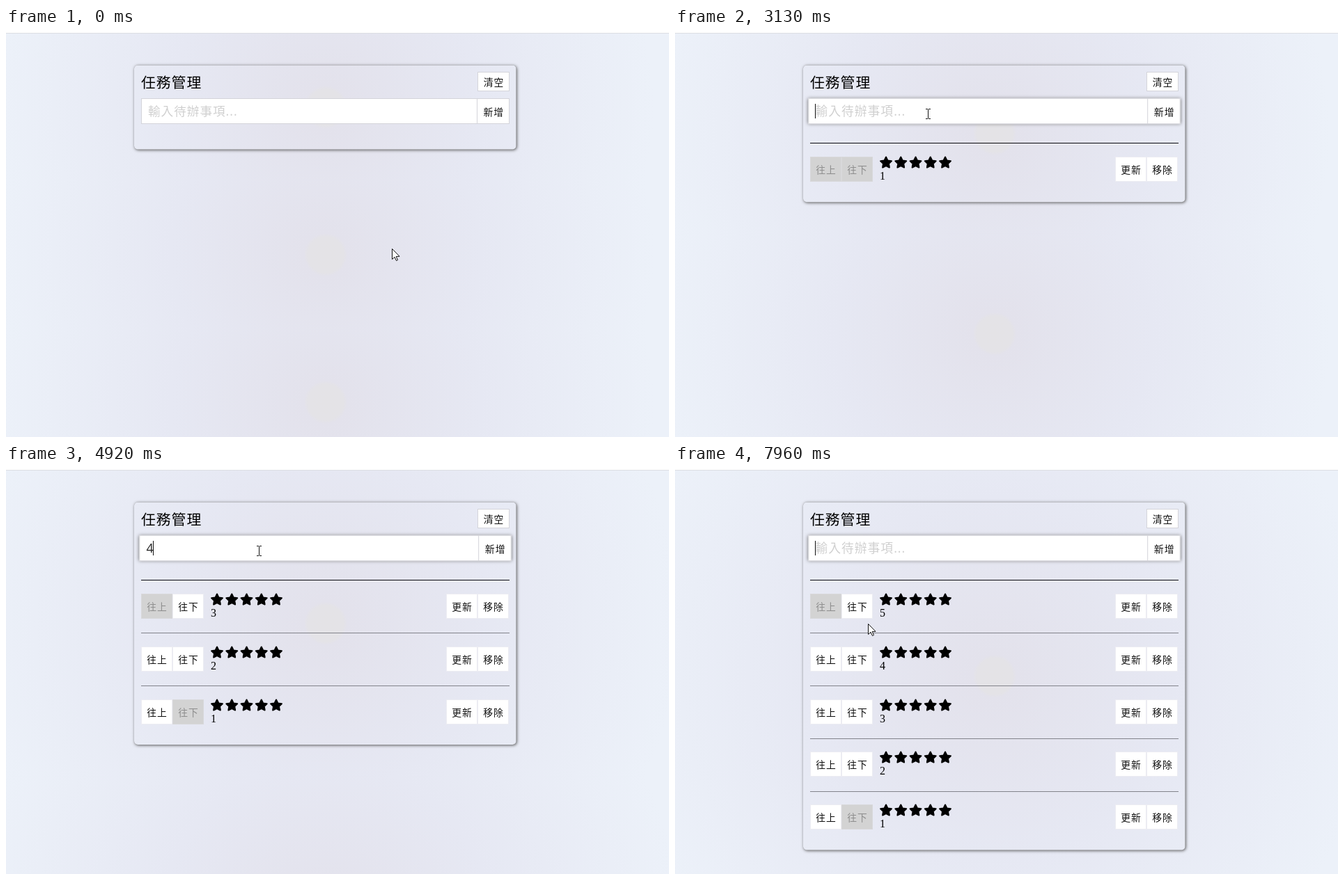
Animation of 952 by 588 pixels, one loop 8000 ms. Source, as an HTML page with a canvas:

```html
<!DOCTYPE html>
<html lang="zh-Hant">
<head>
<meta charset="utf-8">
<title>任務管理</title>
<style>
html, body { margin: 0; width: 100%; height: 100%; overflow: hidden; background: #fff; }
canvas { display: block; width: 952px; height: 588px; }
</style>
</head>
<body>
<canvas id="stage"></canvas>
<script>
const W = 952, H = 588, LOOP = 8000;
const canvas = document.getElementById('stage');
const dpr = window.devicePixelRatio || 1;
canvas.width = W * dpr;
canvas.height = H * dpr;
const ctx = canvas.getContext('2d');

const SANS = '"Open Sans", "Noto Sans CJK TC", "Noto Sans CJK JP", "Noto Sans CJK", sans-serif';
const SERIF = '"Liberation Serif", serif';
const ROW = 75.8, BLINK = 530;
const FOCUS = 620, FOCUS_END = 1240;
const TYPED = [2660, 3440, 4060, 4920, 5610];
const ADDED = [3130, 3820, 4450, 5380, 6160];
const CARET_RESETS = [725, ...TYPED];

// Pointer path: time, x, y
const PATH = [
  [0, 554, 317], [60, 554, 317], [300, 470, 225], [620, 363, 123],
  [7060, 363, 123], [7150, 392, 165], [7240, 440, 240], [7320, 477, 300],
  [7410, 452, 337], [7500, 452, 337], [7740, 355, 280], [7960, 277, 228], [8000, 277, 228]
];

const countBefore = (times, t) => times.filter(x => x <= t).length;
const clamp01 = v => Math.max(0, Math.min(1, v));

function text(str, x, y, size, color, opt = {}) {
  ctx.font = `${opt.weight || 400} ${size}px ${opt.family || SANS}`;
  ctx.letterSpacing = (opt.spacing ?? 1) + 'px';
  ctx.textAlign = opt.align || 'left';
  ctx.fillStyle = color;
  ctx.fillText(str, x, y);
}

function box(x, y, w, h, fill, border) {
  ctx.fillStyle = border;
  ctx.fillRect(x, y, w, h);
  ctx.fillStyle = fill;
  ctx.fillRect(x + 1, y + 1, w - 2, h - 2);
}

function button(label, x, y, w, h, disabled, border = '#ececf2') {
  box(x, y, w, h, disabled ? '#d3d3d3' : '#fff', disabled ? '#d8d8da' : border);
  text(label, x + w / 2 + 0.5, y + h / 2 + 6, 13.8, disabled ? '#8e8e8e' : '#111', { align: 'center' });
}

function background(rows) {
  const tile = 212 + ROW * rows;
  const radius = Math.hypot(459, tile / 2);
  for (let y = 8; y < H; y += tile) {
    const cy = y + tile / 2;
    const g = ctx.createRadialGradient(459, cy, 0, 459, cy, radius);
    g.addColorStop(0, '#e4e3e6');
    g.addColorStop(26 / radius, '#e4e3e7');
    g.addColorStop(31 / radius, '#e3e2ec');
    g.addColorStop(0.47, '#e6e8f3');
    g.addColorStop(1, '#ecf1f9');
    ctx.fillStyle = g;
    ctx.fillRect(0, y, W, tile);
  }
  ctx.fillStyle = '#fff';
  ctx.fillRect(0, 0, W, 7);
  ctx.fillStyle = '#dcdee3';
  ctx.fillRect(0, 7, W, 1);
}

function card(rows) {
  const shape = new Path2D();
  shape.roundRect(184, 53.5, 548.5, 121 + ROW * rows, 5);
  const outside = new Path2D();
  outside.rect(0, 0, W, H);
  outside.addPath(shape);
  ctx.save();
  ctx.clip(outside, 'evenodd');
  ctx.shadowColor = '#555';
  ctx.shadowBlur = 4 * dpr;
  ctx.shadowOffsetX = ctx.shadowOffsetY = dpr;
  ctx.fillStyle = '#999';
  ctx.fill(shape);
  ctx.restore();
}

function field(t, value) {
  const p = 1 - Math.pow(1 - clamp01((t - FOCUS) / (FOCUS_END - FOCUS)), 3);
  const s = 1 + 0.01 * p;
  ctx.save();
  ctx.translate(458.5, 119.5);
  ctx.scale(s, s);
  ctx.translate(-458.5, -119.5);
  ctx.save();
  ctx.shadowColor = `rgba(110,110,110,${p})`;
  ctx.shadowBlur = 5 * dpr;
  ctx.fillStyle = '#fff';
  ctx.fillRect(194, 101, 529, 37);
  ctx.restore();
  box(194, 101, 529, 37, '#fff', '#d4d4da');
  ctx.fillStyle = '#d4d4da';
  ctx.fillRect(676, 101, 1, 37);
  text('新增', 700.3, 125.5, 13.8, '#111', { align: 'center' });
  if (value) text(value, 204, 125.8, 17.6, '#222');
  else text('輸入待辦事項...', 204, 126, 17.6, '#d0d0d0');
  ctx.restore();

  const n = countBefore(CARET_RESETS, t);
  if (n && Math.floor((t - CARET_RESETS[n - 1]) / BLINK) % 2 === 0) {
    ctx.fillStyle = '#111';
    ctx.fillRect(value ? 211 : 201, 109, 1, 21);
  }
}

function star(cx, cy) {
  ctx.beginPath();
  for (let i = 0; i < 10; i++) {
    const r = i % 2 ? 4.2 : 8.3, a = i * Math.PI / 5 - Math.PI / 2;
    ctx.lineTo(cx + r * Math.cos(a), cy + r * Math.sin(a));
  }
  ctx.closePath();
  ctx.fillStyle = ctx.strokeStyle = '#000';
  ctx.lineWidth = 2;
  ctx.lineJoin = 'round';
  ctx.fill();
  ctx.stroke();
}

function row(i, total) {
  const off = ROW * i, y = Math.round(185 + off);
  ctx.fillStyle = i ? '#82838b' : '#0c0c10';
  ctx.fillRect(194, Math.round(165.4 + off), 529, 1);
  button('往上', 194, y, 45, 36, i === 0);
  button('往下', 239, y, 45, 36, i === total - 1);
  for (let k = 0; k < 5; k++) star(303 + 21.25 * k, y + 8.8);
  text(String(total - i), 294, y + 33, 16, '#000', { family: SERIF, spacing: 0 });
  button('更新', 632, y, 45, 36);
  button('移除', 677, y, 45, 36);
}

function pointerAt(t) {
  const i = Math.max(1, PATH.findIndex(k => k[0] > t));
  const [t0, x0, y0] = PATH[i - 1], [t1, x1, y1] = PATH[i];
  const p = clamp01((t - t0) / (t1 - t0));
  return [Math.round(x0 + (x1 - x0) * p), Math.round(y0 + (y1 - y0) * p)];
}

function pointer(t) {
  const [x, y] = pointerAt(t);
  ctx.save();
  ctx.translate(x, y);
  if (y < 138) {
    ctx.fillStyle = '#111';
    ctx.fillRect(0, -6, 1, 13);
    for (const dy of [-7, 7]) {
      ctx.fillRect(-3, dy, 3, 1);
      ctx.fillRect(1, dy, 3, 1);
    }
  } else {
    const pts = [[0, 0], [0, 15], [3.5, 11.8], [6, 17], [8, 16], [5.7, 11], [10.5, 10.8]];
    ctx.translate(0.5, 0.5);
    ctx.beginPath();
    for (const [px, py] of pts) ctx.lineTo(px, py);
    ctx.closePath();
    ctx.fillStyle = '#fff';
    ctx.strokeStyle = '#111';
    ctx.lineWidth = 1;
    ctx.fill();
    ctx.stroke();
  }
  ctx.restore();
}

function draw(t) {
  const rows = countBefore(ADDED, t), typed = countBefore(TYPED, t);
  ctx.setTransform(dpr, 0, 0, dpr, 0, 0);
  background(rows);
  card(rows);
  text('任務管理', 194, 86, 20.8, '#000', { weight: 500 });
  button('清空', 677, 63, 46, 28, false, '#d4d4da');
  field(t, typed > rows ? String(typed) : '');
  for (let i = 0; i < rows; i++) row(i, rows);
  pointer(t);
}

let start;
function tick(now) {
  start ??= now;
  draw((now - start) % LOOP);
  requestAnimationFrame(tick);
}
draw(0);
requestAnimationFrame(tick);
</script>
</body>
</html>
```
